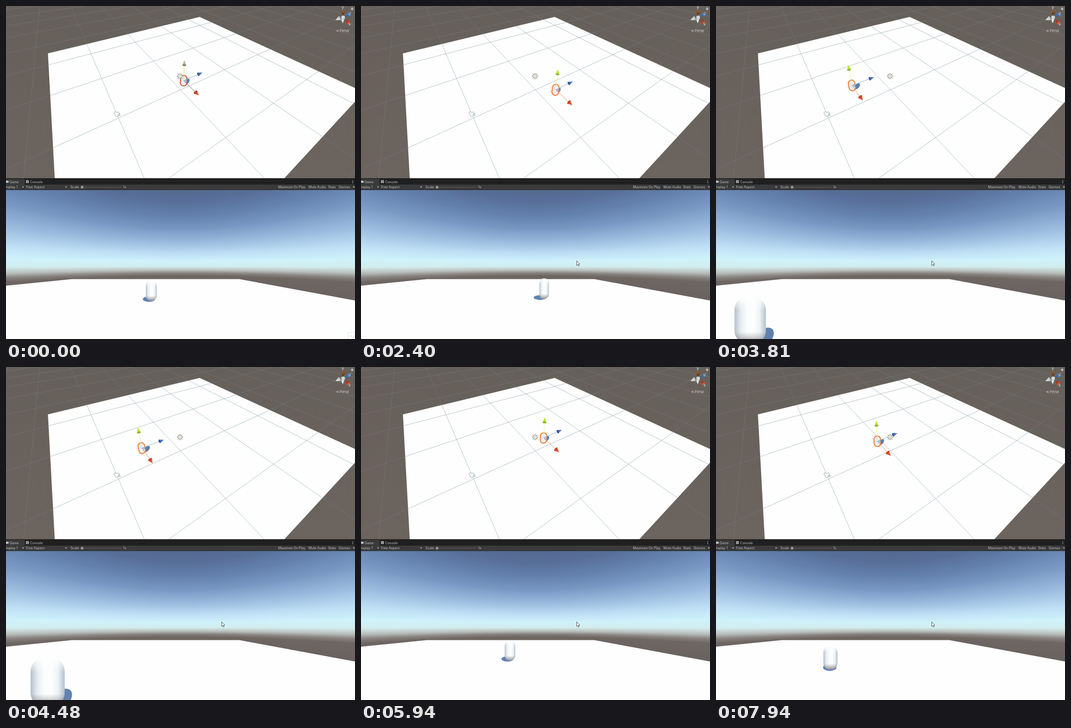
An HTML page with a canvas for the animation above (8 s loop, 766 by 731 pixels).

```html
<!DOCTYPE html>
<html>
<head>
<meta charset="utf-8">
<style>
  html, body { margin: 0; width: 766px; height: 731px; overflow: hidden; background: #6a635e; }
  canvas { position: absolute; left: 0; top: 0; }
</style>
</head>
<body>
<canvas id="back" width="766" height="731"></canvas>
<canvas id="front" width="766" height="731"></canvas>
<script>
const LOOP = 8000;
const back = document.getElementById('back').getContext('2d');
const front = document.getElementById('front').getContext('2d');

// time, editor x and y, then game x, top, bottom and width of the capsule
const KEYS = [
  [0, 390, 164, 319, 603, 647, 24],
  [980, 390, 164, 319, 603, 647, 24],
  [1450, 426, 148, 338, 593, 629, 18],
  [1800, 430, 147, 342, 593, 628, 18],
  [2120, 450, 175, 406, 594, 632, 19],
  [2400, 427, 184, 402, 598, 643, 21],
  [2700, 393, 192, 386, 603, 654, 27],
  [3200, 329, 184, 244, 629, 704, 45],
  [3600, 303, 184, 120, 640, 745, 68],
  [4060, 293, 163, 22, 634, 738, 70],
  [4480, 298, 178, 91, 638, 745, 75],
  [5210, 358, 199, 358, 617, 687, 36],
  [5330, 366, 195, 364, 612, 676, 33],
  [6140, 412, 143, 315, 597, 634, 20],
  [6740, 387, 120, 228, 595, 632, 21],
  [6960, 373, 109, 184, 595, 631, 21],
  [7320, 347, 120, 143, 601, 645, 25],
  [7810, 340, 155, 220, 610, 660, 30],
  [7940, 354, 163, 251, 612, 664, 31],
  [8000, 360, 166, 264, 613, 666, 32]
];

function poseAt(t) {
  const i = KEYS.findIndex(k => k[0] > t);
  const a = KEYS[i - 1], b = KEYS[i], p = (t - a[0]) / (b[0] - a[0]);
  return a.map((n, j) => n + (b[j] - n) * p);
}

function poly(c, points, fill) {
  c.beginPath();
  points.forEach(([x, y]) => c.lineTo(x, y));
  c.closePath();
  if (fill) { c.fillStyle = fill; c.fill(); }
}

function line(c, x1, y1, x2, y2, color, width = 1) {
  c.strokeStyle = color;
  c.lineWidth = width;
  c.beginPath();
  c.moveTo(x1, y1);
  c.lineTo(x2, y2);
  c.stroke();
}

function disc(c, x, y, r, fill, stroke) {
  c.beginPath();
  c.arc(x, y, r, 0, 7);
  if (fill) { c.fillStyle = fill; c.fill(); }
  if (stroke) { c.strokeStyle = stroke; c.lineWidth = 1; c.stroke(); }
}

function oval(c, x, y, rx, ry, angle, fill) {
  c.fillStyle = fill;
  c.beginPath();
  c.ellipse(x, y, rx, ry, angle, 0, 7);
  c.fill();
}

function text(c, s, x, y, color = '#c4c4c4', size = 7.15) {
  c.font = size + 'px Inter, sans-serif';
  c.fillStyle = color;
  c.fillText(s, x, y);
}

// arrow head with its tip at (x, y), pointing along (dx, dy)
function cone(c, x, y, dx, dy, length, half, light, dark) {
  const n = Math.hypot(dx, dy), ux = dx / n, uy = dy / n;
  const bx = x - ux * length, by = y - uy * length;
  poly(c, [[x, y], [bx - uy * half, by + ux * half], [bx + uy * half, by - ux * half]], light);
  oval(c, bx, by, half, half * .45, Math.atan2(uy, ux) + Math.PI / 2, dark);
}

// ground grid to editor view
function ground(u, v) {
  const d = 1 - .25 * u + .168 * v;
  return [(383 - 21.5 * u + 177.5 * v) / d, (184 + 32.5 * u - 20.6 * v) / d];
}

function grid(c, color) {
  for (let i = -9; i < 9; i++) {
    line(c, ...ground(-12, i), ...ground(Math.min(6, (.95 + .168 * i) / .25), i), color);
    line(c, ...ground(i, Math.max(-4, (.25 * i - .95) / .168)), ...ground(i, 12), color);
  }
}

function drawEditor(c) {
  const bg = c.createLinearGradient(0, 0, 0, 378);
  bg.addColorStop(0, '#66605b');
  bg.addColorStop(1, '#6b645f');
  c.fillStyle = bg;
  c.fillRect(0, 0, 766, 378);
  c.save();
  c.beginPath();
  c.rect(0, 0, 766, 378);
  c.clip();
  grid(c, 'rgba(135,160,160,.25)');
  poly(c, [[92, 104], [425, 24], [785.5, 189], [611, 378], [107, 378]], '#fefefe');
  c.clip();
  grid(c, 'rgba(120,150,160,.6)');
  c.restore();

  cone(c, 723, 31, -17, 8, 10, 4.5, '#d5dcdd', '#b9c4c6');
  cone(c, 739, 38, 0, 1, 9, 3.5, '#e8eced', '#c3cacc');
  cone(c, 740, 24, 0, 1, 12, 5, '#6b4526', '#8a5a30');
  cone(c, 744, 23, -9, 5, 10, 4, '#3e6ba8', '#5c8fd0');
  cone(c, 744, 29, -9, -9, 11, 4.5, '#a83a22', '#d4553a');
  disc(c, 740, 25, 4, '#cfd8da');
  text(c, 'y', 737, 6, '#eee', 8);
  text(c, 'z', 753, 19, '#b9d4f2', 8);
  text(c, 'x', 752, 43, '#eee', 8);
  text(c, 'Persp', 732.5, 57, '#d2d0ce', 7.4);
  line(c, 730, 52, 725, 54.5, '#c4c2c0', .8);
  line(c, 725, 54.5, 730, 57, '#c4c2c0', .8);
  line(c, 725, 54.5, 730.5, 54.5, '#c4c2c0', .7);
  c.fillStyle = '#c4c2c0';
  c.fillRect(757.5, 5, 4.5, 3.5);
  disc(c, 759.7, 4.5, 1.6, null, '#c4c2c0');

  // camera icon
  for (const [x, y, r] of [[240, 235, 3], [246, 235.5, 2.8], [243, 239, 3.5]]) disc(c, x, y, r, '#fff', '#8fa5a8');
  poly(c, [[246, 239], [250, 236.5], [250, 241.5]], '#fff');
  c.stroke();
  disc(c, 243, 237.5, 3.2, '#fff');
}

function drawBars(c) {
  const box = (x, y, w, h, color) => { c.fillStyle = color; c.fillRect(x, y, w, h); };
  box(0, 378, 766, 14, '#202020');
  box(0, 379.5, 41, 13, '#3a3a3a');
  box(0, 392, 766, 12, '#3a3a3a');
  box(0, 403, 766, 1, '#2a2a2a');
  text(c, 'Game', 8, 388.6);
  text(c, 'Console', 53, 388.6);
  c.beginPath();
  c.roundRect(-1, 383.5, 7, 4.5, 2);
  c.fillStyle = '#c4c4c4';
  c.fill();
  box(44, 382.5, 6, 6.5, '#c4c4c4');
  for (const y of [384, 386, 388]) box(45, y, 4, .8, '#333');
  for (const y of [382.5, 385, 387.5]) box(760.3, y, 1.4, 1.4, '#c4c4c4');
  const y = 400.2;
  text(c, 'Display 1', -4, y);
  text(c, 'Free Aspect', 44, y);
  text(c, 'Scale', 141.5, y);
  text(c, '1x', 257, y);
  text(c, 'Maximize On Play', 597, y);
  text(c, 'Mute Audio', 664, y);
  text(c, 'Stats', 707, y);
  text(c, 'Gizmos', 730, y);
  for (const x of [37.5, 132, 763.5]) poly(c, [[x - 2.2, 396.3], [x + 2.2, 396.3], [x, 399]], '#c4c4c4');
  for (const x of [41, 137, 594, 660, 704, 727]) box(x, 392, .6, 11, '#303030');
  box(167, 397.2, 87, 1, '#606060');
  disc(c, 167, 397.7, 3, '#999');
}

function drawSky(c) {
  const sky = c.createLinearGradient(0, -166, 0, 40);
  [[-166, '#54698f'], [-140, '#586f9a'], [-110, '#6380ad'], [-80, '#7898c3'], [-50, '#9bbcde'],
   [-25, '#bfe0f5'], [-9, '#cff2fa'], [2, '#d2ecec'], [10, '#b7bdba'], [16, '#888380'],
   [22, '#6d6663'], [40, '#6a6360']].forEach(([y, color]) => sky.addColorStop((y + 166) / 206, color));
  c.fillStyle = sky;
  // elevation drops towards the sides of a wide view
  for (let x = 0; x < 766; x += 2) {
    const s = Math.hypot(1, (x - 383) / 283);
    c.setTransform(1, 0, 0, s, x, 570);
    c.fillRect(0, -166 / s, 2, 327 / s);
  }
  c.resetTransform();
  poly(c, [[0, 614], [145, 599.5], [512, 599.5], [766, 646.5], [766, 731], [0, 731]], '#fefefe');
}

function drawLight(c) {
  for (let i = 0; i < 8; i++) {
    const a = i * Math.PI / 4, x = Math.cos(a), y = Math.sin(a);
    line(c, 382 + x * 4, 154 + y * 4, 382 + x * 6.8, 154 + y * 6.8, '#a3a69b', 2);
  }
  disc(c, 382, 154, 4.3, '#f4f4ea', '#9b9e94');
  disc(c, 382, 154, 2, '#fff', '#bcbfae');
}

function drawHandles(c, x, y, live) {
  const k = 1 + (y - 160) * .002;
  const up = [(x - 375) * .11, -45];
  const side = [33 + (x - 390) * .1, 32 + (y - 164) * .08];
  const ahead = [41 - (x - 390) * .08, -18 - (y - 164) * .02];
  oval(c, x + 8 - (x - 360) / 20, y + 2, 8 * k, 4.5 * k, -.8, '#5b7dab');

  c.save();
  c.translate(x, y);
  c.rotate(Math.atan2(up[0], 45));
  c.beginPath();
  c.roundRect(-7 * k, -11.5 * k, 14 * k, 23 * k, 7 * k);
  c.fillStyle = '#eef3f2';
  c.fill();
  c.strokeStyle = live ? '#f0742a' : '#c8492a';
  c.lineWidth = 2;
  c.stroke();
  c.restore();
  poly(c, [[x - 12, y - 5], [x - 3, y - 8], [x - 2, y + 1], [x - 11, y + 4]]);
  c.strokeStyle = 'rgba(205,165,155,.45)';
  c.lineWidth = .8;
  c.stroke();

  line(c, x, y, x + up[0] * .75, y - 34, live ? '#ecec9c' : '#e6dc5a');
  line(c, x, y, x + side[0] * .8, y + side[1] * .8, live ? '#f08a68' : '#6b5850');
  line(c, x, y, x + ahead[0] * .8, y + ahead[1] * .8, '#86aee0');
  poly(c, [[x, y], [x + 6, y - 3], [x + 8, y + 2], [x + 4, y + 5]], 'rgba(130,175,215,.65)');
  cone(c, x + ahead[0], y + ahead[1], ...ahead, 10, 4, '#4a72c4', '#34569c');
  cone(c, x + side[0], y + side[1], ...side, 10, 4.8, live ? '#e9532e' : '#d04e2c', live ? '#c64426' : '#b8452a');
  cone(c, x + up[0], y + up[1], ...up, 11, 4.3, live ? '#b5e62c' : '#b9b99e', live ? '#8fb62a' : '#85856c');
}

function drawCapsule(c, x, top, bottom, w) {
  const h = bottom - top, left = x - w / 2;
  const dx = -w * (x - 232) / 400;
  oval(c, x + dx, bottom - .15 * w, .45 * w + Math.max(0, -dx) * .5, .25 * w, -Math.max(0, dx) * .03, '#6281b0');

  const body = c.createLinearGradient(left, 0, left + w, 0);
  ['#b3c1cc', '#e6edf1', '#fafcfd', '#fdfefe', '#eef3f6', '#b4c0ca'].forEach((s, i) => body.addColorStop(i / 5, s));
  const shade = c.createLinearGradient(0, top, 0, bottom);
  shade.addColorStop(0, 'rgba(254,254,254,.95)');
  shade.addColorStop(.3, 'rgba(254,254,254,0)');
  shade.addColorStop(.75, 'rgba(120,120,120,0)');
  shade.addColorStop(1, 'rgba(112,112,114,.75)');
  c.beginPath();
  c.roundRect(left, top, w, h, Math.min(w / 2, h * .28));
  c.fillStyle = body;
  c.fill();
  c.fillStyle = shade;
  c.fill();
}

function drawPointer(c, t) {
  if (t < 70) return;
  const p = Math.min(1, (t - 70) / 600), q = 1 - p;
  const x = q * q * 752 + 2 * p * q * 640 + p * p * 473.5;
  const y = q * q * 712 + 2 * p * q * 500 + p * p * 559.5;
  poly(c, [[0, 0], [0, 10], [2.2, 8], [3.8, 11.3], [5.3, 10.6], [3.8, 7.4], [6.6, 7]].map(([a, b]) => [x + a, y + b]), '#fff');
  c.strokeStyle = '#222';
  c.lineWidth = .8;
  c.stroke();
}

function drawHint(c) {
  c.strokeStyle = '#dbe6e8';
  c.lineWidth = 1;
  c.strokeRect(750.5, 716.5, 18, 15);
  text(c, 'in 2', 755, 727, '#c6d6d9', 7);
}

function frame(now) {
  const t = now % LOOP, c = front;
  const [, x, y, gameX, top, bottom, width] = poseAt(t);
  c.clearRect(0, 0, 766, 731);
  drawHandles(c, x, y, t >= 1000);
  drawLight(c);
  drawCapsule(c, gameX, top, bottom, width);
  if (t < 300) drawHint(c);
  drawPointer(c, t);
  requestAnimationFrame(frame);
}

drawEditor(back);
drawSky(back);
drawBars(back);
requestAnimationFrame(frame);
</script>
</body>
</html>
```
